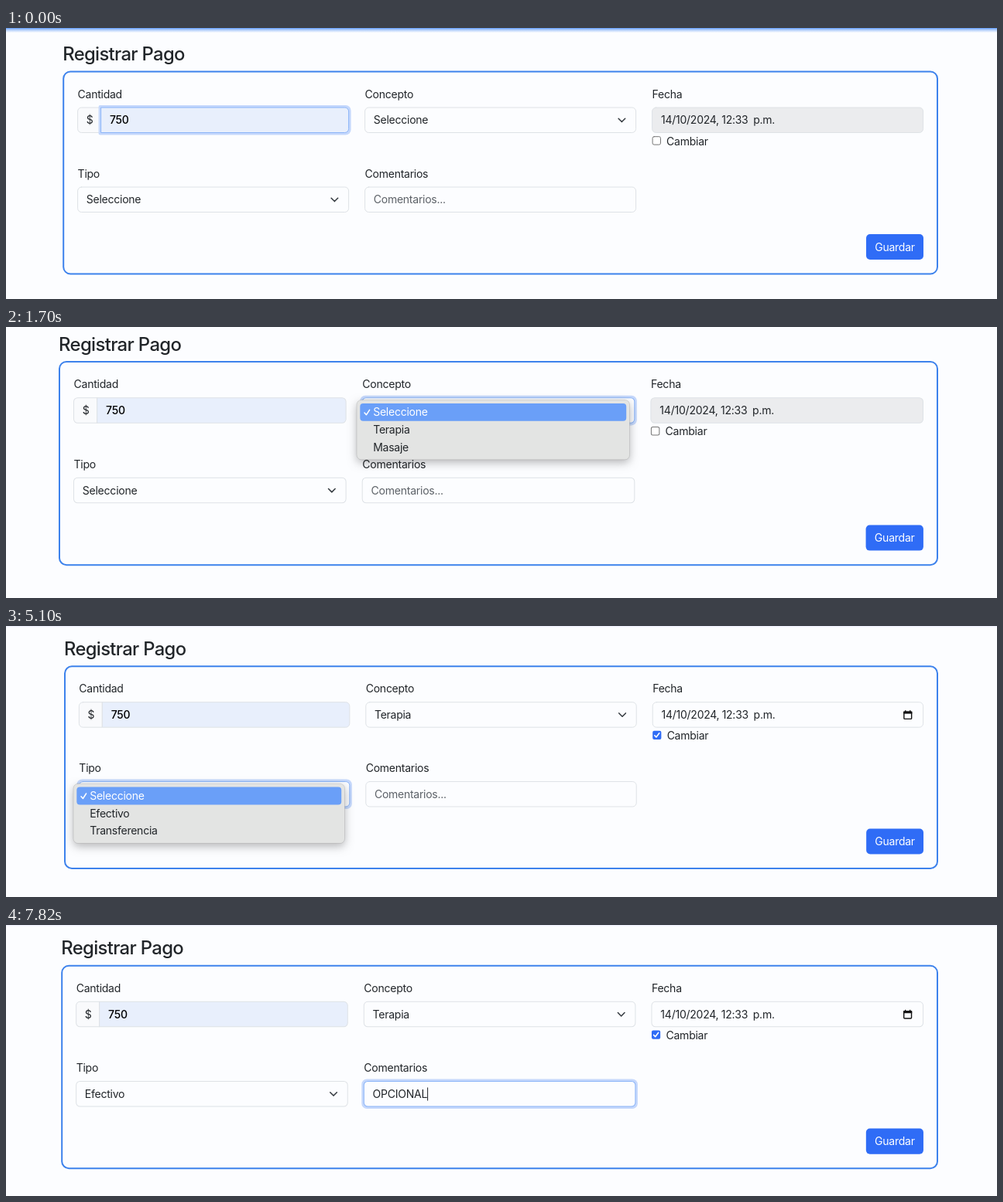
Recreate the animation shown at these times as an HTML page with a canvas. Size 1280x351 px, loop 8500 ms.

```html
<!DOCTYPE html>
<html lang="es">
<head>
<meta charset="utf-8">
<title>Registrar Pago</title>
<style>
  html, body { margin: 0; width: 100%; height: 100%; overflow: hidden; background: #fcfdff; }
  canvas { display: block; width: 1280px; height: 351px; }
</style>
</head>
<body>
<canvas id="stage" width="1280" height="351"></canvas>
<script>
const ctx = document.getElementById('stage').getContext('2d');

const PAGE = '#fcfdff', INK = '#212529', BLUE = '#2f6cf6', LINE = '#dee2e6';
const UI = 'Inter, sans-serif', ARIAL = '"Liberation Sans", Arial, sans-serif';
const HOLD = 1700;
const RIGHT = 1203, PANEL_W = 1128.8, PANEL_H = 262;
const COLS = [18.4, 389.4, 760.4], FIELD_W = 350, FIELD_H = 32.5;
const ROW1 = 46.5, ROW2 = 149.5;

// left/top place the panel; the form scales so its right edge stays put
const scenes = [
  { left: 74.2, top: 56.5, focus: 'amount', disabled: true, bar: 'blue' },
  { left: 69, top: 45, focus: 'concept', disabled: true,
    menu: { x: 453, y: 94.5, w: 352.5, items: ['Seleccione', 'Terapia', 'Masaje'] } },
  { left: 72.1, top: 21.3, concept: 'Terapia', checked: true, picker: true },
  { left: 76, top: 52.3, concept: 'Terapia', checked: true, focus: 'type', bar: 'faint',
    menu: { x: 87, y: 204.2, w: 350.5, items: ['Seleccione', 'Efectivo', 'Transferencia'] } },
  { left: 72.2, top: 52.7, concept: 'Terapia', checked: true, type: 'Efectivo',
    focus: 'notes', notes: 'OPCIONAL', bar: 'faint' }
];

function text(str, x, y, { size = 14, color = INK, weight = 400, gap = -0.25, font = UI, align = 'left' } = {}) {
  ctx.font = `${weight} ${size}px ${font}`;
  ctx.letterSpacing = gap + 'px';
  ctx.textAlign = align;
  ctx.fillStyle = color;
  ctx.fillText(str, x, y);
}

function box(x, y, w, h, r, fill, stroke, lw = 1) {
  ctx.beginPath();
  ctx.roundRect(x, y, w, h, r);
  if (fill) { ctx.fillStyle = fill; ctx.fill(); }
  if (stroke) { ctx.strokeStyle = stroke; ctx.lineWidth = lw; ctx.stroke(); }
}

function path(points, color, lw) {
  ctx.beginPath();
  points.forEach(([x, y]) => ctx.lineTo(x, y));
  ctx.strokeStyle = color;
  ctx.lineWidth = lw;
  ctx.lineCap = ctx.lineJoin = 'round';
  ctx.stroke();
}

function shadowBox(x, y, w, h, r, fill, blur, alpha) {
  ctx.save();
  ctx.shadowColor = `rgba(0,0,0,${alpha})`;
  ctx.shadowBlur = blur;
  ctx.shadowOffsetY = 4;
  box(x, y, w, h, r, fill);
  ctx.restore();
}

function field(x, y, w, focused, fill = PAGE, r = 5) {
  if (focused) box(x - 3, y - 3, w + 6, FIELD_H + 6, r === 5 ? 7 : [2, 7, 7, 2], '#c5d8fc');
  box(x, y, w, FIELD_H, r, fill, focused ? '#8ab4f8' : LINE);
}

function select(col, y, value, focused) {
  const x = COLS[col], end = x + FIELD_W;
  field(x, y, FIELD_W, focused);
  text(value, x + 11.2, y + 21.4);
  path([[end - 22.5, y + 14.2], [end - 18.2, y + 18.6], [end - 13.9, y + 14.2]], '#343a40', 1.5);
}

function amount(focused) {
  const x = COLS[0];
  box(x, ROW1, 30, FIELD_H, [5, 0, 0, 5], '#f9fafc', LINE);
  field(x + 30, ROW1, FIELD_W - 30, focused, '#e8effc', [0, 5, 5, 0]);
  text('$', x + 11.2, ROW1 + 21.4);
  text('750', x + 41.4, ROW1 + 21.4, { color: '#000', weight: 500 });
}

function calendarIcon(x, y) {
  box(x + 0.7, y + 1.9, 9.8, 9.3, 1, null, '#111', 1.4);
  ctx.fillStyle = '#111';
  ctx.fillRect(x, y + 1.4, 11.2, 3);
  ctx.fillRect(x + 1.9, y, 1.4, 2);
  ctx.fillRect(x + 7.9, y, 1.4, 2);
}

function dateField(s) {
  const x = COLS[2], y = ROW1 + 21.4;
  field(x, ROW1, FIELD_W, false, s.disabled ? '#ebecee' : PAGE);
  text('14/10/2024,', x + 11.4, y);
  text('12:33', x + 89.6, y);
  text('p.m.', x + 130.6, y);
  if (!s.disabled) calendarIcon(x + 324.5, ROW1 + 10.5);

  if (s.checked) {
    box(x, 83.7, 11.2, 11.2, 2, BLUE);
    path([[x + 2.6, 89.6], [x + 4.7, 91.8], [x + 8.6, 86.6]], '#fff', 1.6);
  } else {
    box(x + 0.5, 84.2, 10.4, 10.4, 2, '#fff', '#767676');
  }
  text('Cambiar', x + 18.5, 95);
}

function notesField(s) {
  const x = COLS[1], y = ROW2 + 21.4;
  field(x, ROW2, FIELD_W, s.focus === 'notes');
  text(s.notes || 'Comentarios...', x + 11.2, y, { color: s.notes ? INK : '#5d6268' });
  if (s.notes) {
    const end = x + 11.2 + ctx.measureText(s.notes).width;
    ctx.fillRect(end, ROW2 + 8, 1, 17);
  }
}

function form(s) {
  const k = (RIGHT - s.left) / PANEL_W;
  ctx.save();
  ctx.translate(s.left, s.top);
  ctx.scale(k, k);
  text('Registrar Pago', -1, -14.2, { size: 23.8, weight: 500, gap: -0.65 });
  box(0, 0, PANEL_W, PANEL_H, 9, null, '#3d82ec', 2);

  ['Cantidad', 'Concepto', 'Fecha'].forEach((label, i) => text(label, COLS[i], 34));
  ['Tipo', 'Comentarios'].forEach((label, i) => text(label, COLS[i], 137));

  amount(s.focus === 'amount');
  select(1, ROW1, s.concept || 'Seleccione', s.focus === 'concept');
  dateField(s);
  select(0, ROW2, s.type || 'Seleccione', s.focus === 'type');
  notesField(s);

  box(1036.8, 210.5, 74, 33, 5, BLUE);
  text('Guardar', 1073.8, 232, { color: '#fff', align: 'center' });
  ctx.restore();
}

function topBar(kind) {
  if (kind === 'blue') {
    const g = ctx.createLinearGradient(0, 0, 0, 6);
    g.addColorStop(0, '#5c98f7');
    g.addColorStop(0.3, '#a3c5fa');
    g.addColorStop(1, PAGE);
    ctx.fillStyle = g;
    ctx.fillRect(0, 0, 1280, 6);
  } else if (kind === 'faint') {
    ctx.fillStyle = '#eff1fd';
    ctx.fillRect(0, 0, 1280, 1.4);
  }
}

function menu({ x, y, w, items }) {
  shadowBox(x, y, w, 77.3, 6, '#e3e4e3', 12, 0.28);
  box(x, y, w, 77.3, 6, null, 'rgba(0,0,0,.13)', 0.8);
  box(x + 4.3, y + 4.4, w - 8.6, 22.9, 4, '#6a9ff8');
  path([[x + 10, y + 16.6], [x + 12.4, y + 19.3], [x + 16.6, y + 12.8]], '#fff', 1.5);
  items.forEach((item, i) =>
    text(item, x + 21.2, y + 20.6 + i * 22.8, { color: i ? INK : '#fff' }));
}

function arrow(x, y, dir) {
  path([[x, y - 6.7], [x, y + 6.7]], '#333', 1.2);
  path([[x - 6.3, y - dir * 0.5], [x, y - dir * 6.7], [x + 6.3, y - dir * 0.5]], '#333', 1.2);
}

function picker() {
  const small = { size: 10.7, gap: 0, font: ARIAL, color: '#111' };
  const mid = { ...small, align: 'center' };

  // edge of the focused checkbox
  ctx.fillStyle = '#a9c6fa';
  ctx.fillRect(832.8, 106, 2, 10);

  shadowBox(834.5, 100.5, 342.5, 246.5, 1, '#fff', 12, 0.35);
  box(834.5, 100.5, 342.5, 246.5, 1, null, '#c4c6c9', 0.8);

  text('octubre de 2024', 844, 124, { ...small, size: 10.5, weight: 700 });
  ctx.beginPath();
  ctx.moveTo(927, 119);
  ctx.lineTo(934, 119);
  ctx.lineTo(930.5, 122.7);
  ctx.fill();
  arrow(975, 121.3, 1);
  arrow(1003, 121.3, -1);

  [...'LMMJVSD'].forEach((d, i) => text(d, 856 + i * 24.5, 156.8, mid));
  box(844.4, 214.6, 23.4, 23.4, 1, '#3273f0', '#2258c4', 1.2);
  for (let i = 0; i < 42; i++) {
    const inMonth = i > 0 && i < 32;
    const day = i === 0 ? 30 : inMonth ? i : i - 31;
    const picked = i === 14;
    text(day, 856 + (i % 7) * 24.5, 181.8 + Math.floor(i / 7) * 24.5, {
      ...mid, weight: picked ? 700 : 400,
      color: picked ? '#fff' : inMonth ? '#111' : '#757575'
    });
  }
  text('Borrar', 853, 331.3, { ...small, color: '#1a67d8' });
  text('Hoy', 987, 331.3, { ...small, color: '#1a67d8' });

  const pad = n => String(n).padStart(2, '0');
  const hours = Array.from({ length: 7 }, (_, i) => pad(i || 12));
  const minutes = Array.from({ length: 7 }, (_, i) => pad(33 + i));
  [hours, minutes, ['p.m.', 'a.m.']].forEach((list, c) => {
    const x = 1051 + c * 49;
    box(x - 22.8, 113.3, 45.6, 31.7, 1, '#3273f0');
    list.forEach((v, i) => text(v, x, 133.2 + i * 31.5, {
      ...mid, size: 12, weight: i ? 400 : 700, color: i ? '#111' : '#fff'
    }));
  });
}

function draw(time) {
  const s = scenes[Math.floor(time / HOLD) % scenes.length];
  ctx.fillStyle = PAGE;
  ctx.fillRect(0, 0, 1280, 351);
  topBar(s.bar);
  form(s);
  if (s.menu) menu(s.menu);
  if (s.picker) picker();
}

const start = performance.now();
function tick() {
  draw(performance.now() - start);
  requestAnimationFrame(tick);
}
tick();
</script>
</body>
</html>
```
